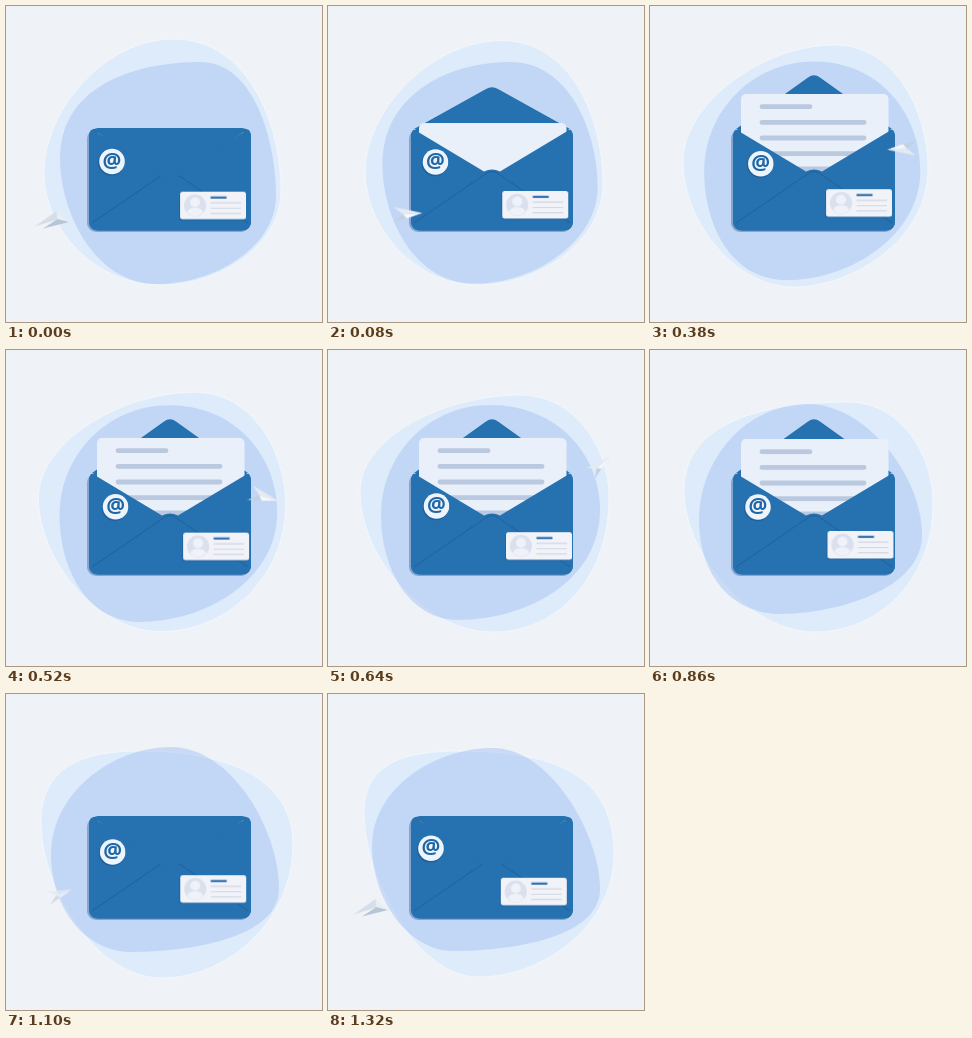
Recreate the animation shown at these times as an HTML page without scripts. Size 316 by 316 pixels, loop 1.34 s.

```html
<!DOCTYPE html>
<html lang="en">
<head>
<meta charset="utf-8">
<title>Mail envelope</title>
<style>
html, body { margin: 0; width: 100%; height: 100%; overflow: hidden; background: #eff2f6; }
svg { display: block; width: 100%; height: 100%; }
svg * { animation: 1340ms linear infinite; }

.outer { fill: #deebfa; stroke: #f5f9fd; stroke-width: .8; animation-name: outer; }
.inner { fill: rgb(168 195 244 / .5); animation-name: inner; }
.blue { fill: #2671b0; }
.fold { fill: none; stroke: #1f609d; stroke-width: 1; }
.shadow { fill: #4a72a8; opacity: .5; }

.flap { transform-origin: 164px 123px; }
.flap.up { animation-name: flap-up; }
.flap.down { animation-name: flap-down; }
.letter { animation-name: letter; }
.rows path {
  fill: none; stroke: #bac9df; stroke-width: 4.8; stroke-linecap: round;
  stroke-dasharray: 1 2; animation-name: write; animation-delay: var(--at);
  animation-fill-mode: backwards;
}
.badge { animation-name: badge; }
.badge text { font: 700 21px "Open Sans", sans-serif; fill: #1f66a6; text-anchor: middle; }
.card { animation-name: card; }
.flight { animation-name: flight, flight-fade; }
.rest { animation-name: rest, rest-fade; }

@keyframes outer {
  0% { d: path("M38 167C38 105 98 33 168 33C240 33 275 115 275 185C275 238 216 279 155 279C88 279 38 222 38 167Z"); }
  14.93% { d: path("M36 163C36 110 105 37 183 37C245 37 275 105 275 168C275 230 205 279 142 279C85 279 36 220 36 163Z"); }
  28.36% { d: path("M33 155C33 100 110 39 185 39C245 39 278 105 278 163C278 232 205 281 143 281C85 281 33 215 33 155Z"); }
  47.76% { d: path("M32 142C32 85 120 45 192 45C245 45 281 95 281 148C281 225 232 282 165 282C95 282 32 205 32 142Z"); }
  64.18% { d: path("M34 140C34 72 115 52 198 52C248 52 283 100 283 155C283 228 230 282 165 282C100 282 34 205 34 140Z"); }
  82.09% { d: path("M35 128C35 68 85 57 135 57C222 57 287 85 287 150C287 228 220 284 156 284C90 284 35 195 35 128Z"); }
  98.51%, 100% { d: path("M36 118C36 65 85 57 132 57C225 57 286 80 286 160C286 232 215 283 150 283C90 283 36 185 36 118Z"); }
}
@keyframes inner {
  0% { d: path("M54 152C54 85 120 56 195 56C248 56 270 135 270 190C270 240 210 278 150 278C90 278 54 208 54 152Z"); }
  14.93% { d: path("M55 165C55 105 105 56 165 56C230 56 269 110 269 170C269 225 205 277 140 277C85 277 55 225 55 165Z"); }
  47.76% { d: path("M53 165C53 105 100 55 162 55C230 55 272 105 272 160C272 230 200 270 130 270C82 270 53 220 53 165Z"); }
  64.18% { d: path("M49 170C49 110 95 54 158 54C215 54 272 125 272 185C272 240 185 264 130 264C82 264 49 225 49 170Z"); }
  82.09% { d: path("M45 160C45 100 105 53 165 53C225 53 273 135 273 195C273 245 180 258 125 258C80 258 45 215 45 160Z"); }
  98.51%, 100% { d: path("M44 152C44 95 105 54 165 54C222 54 272 140 272 195C272 245 180 257 125 257C80 257 44 205 44 152Z"); }
}
@keyframes flap-down {
  0%, 80.6%, 100% { transform: scaleY(1); }
  3.4%, 77.6% { transform: scaleY(0); }
}
@keyframes flap-up {
  0%, 3.4%, 77.6%, 100% { transform: scaleY(0); }
  6.8%, 74.6% { transform: scaleY(1); }
}
@keyframes letter {
  0%, 4.5% { transform: translateY(36px); animation-timing-function: ease-out; }
  17.2% { transform: none; }
  62.7% { transform: none; animation-timing-function: ease-in; }
  74.6%, 100% { transform: translateY(36px); }
}
@keyframes write {
  0% { stroke-dashoffset: 1.1; }
  5.2%, 69% { stroke-dashoffset: 0; }
  69.01%, 100% { stroke-dashoffset: 1.1; }
}
@keyframes badge {
  0% { transform: translate(106px, 155.5px); }
  14.93% { transform: translate(109.7px, 156.7px); }
  28.36% { transform: translate(110.8px, 157.7px); }
  47.76% { transform: translate(108.5px, 156px); }
  64.18% { transform: translate(108px, 157px); }
  82.09% { transform: translate(106.7px, 158px); }
  98.51%, 100% { transform: translate(103px, 154.3px); }
}
@keyframes card {
  0% { transform: translate(174px, 185.7px); }
  14.93% { transform: translate(174.6px, 184px); }
  28.36% { transform: translate(176px, 183.2px); }
  47.76% { transform: translate(178px, 182.2px); }
  64.18% { transform: translate(177.5px, 181px); }
  82.09% { transform: translate(174.2px, 181.2px); }
  98.51%, 100% { transform: translate(172.8px, 183.8px); }
}
@keyframes flight {
  0%, 3.73% { transform: translate(62px, 212px) rotate(22deg); }
  8.96% { transform: translate(100px, 206px) rotate(12deg); }
  14.93% { transform: translate(157px, 186px); }
  21.64% { transform: translate(262px, 150px) rotate(-20deg); }
  24.63% { transform: translate(281px, 120px) rotate(-80deg); }
  28.36% { transform: translate(253px, 141px) rotate(-161deg); }
  33.6% { transform: translate(244px, 162px) rotate(-260deg); }
  40.3% { transform: translate(260px, 144px) rotate(-340deg); }
  47.76% { transform: translate(272px, 117px) rotate(-380deg) scale(.88); }
  53.7% { transform: translate(286px, 101px) rotate(-385deg) scale(.75); }
  53.71%, 79.1% { transform: translate(62px, 196px) scale(.8); }
  82.09% { transform: translate(54px, 201px) scale(.85); }
  85.8%, 100% { transform: translate(44px, 211px) rotate(20deg); }
}
@keyframes flight-fade {
  0%, 3.72% { opacity: 0; }
  3.73%, 49% { opacity: 1; }
  54%, 79.1% { opacity: 0; }
  82.09% { opacity: .7; }
  85.8% { opacity: 1; }
  85.81%, 100% { opacity: 0; }
}
@keyframes rest {
  0% { transform: none; }
  1.5% { transform: translate(2px, 0); }
  3.73% { transform: translate(14px, -1px); }
  3.74%, 85.8% { transform: translate(-3px, -2px); }
  91% { transform: translate(-5.5px, 0); }
  98.51%, 100% { transform: translate(-3px, 0); }
}
@keyframes rest-fade {
  0%, 3.72% { opacity: 1; }
  3.73%, 85.8% { opacity: 0; }
  85.81%, 100% { opacity: 1; }
}
</style>
</head>
<body>
<svg viewBox="0 0 316 316">
  <path class="outer"/>
  <path class="inner"/>

  <rect class="shadow" x="81" y="123.5" width="163" height="102.5" rx="9"/>
  <rect class="blue" x="83" y="122" width="162" height="102.5" rx="9"/>
  <path class="blue flap up" d="M86 123L158 71.5Q164 67 170 71.5L242 123Z"/>

  <g class="letter">
    <rect x="91" y="88" width="147.5" height="95" rx="5" fill="#e9f0fa"/>
    <g class="rows">
      <path pathLength="1" d="M112 100.7H160" style="--at:90ms"/>
      <path pathLength="1" d="M112 116.4H214" style="--at:165ms"/>
      <path pathLength="1" d="M112 132H214" style="--at:235ms"/>
      <path pathLength="1" d="M112 147.6H214" style="--at:285ms"/>
      <path pathLength="1" d="M112 163H214" style="--at:320ms"/>
    </g>
  </g>

  <path class="blue" d="M83 131Q83 125 86 123.5L156 165.5Q164 161.5 172 165.5L242 123.5Q245 125 245 131V215.5Q245 224.5 236 224.5H92Q83 224.5 83 215.5Z"/>
  <path class="fold" d="M86 217L156 169Q164 162 172 169L242 217"/>
  <path class="blue flap down" d="M86 123L158 172.5Q164 177 170 172.5L242 123Z"/>

  <g class="badge">
    <circle cx="-.8" cy="1" r="13.2" fill="#1b558f" opacity=".6"/>
    <circle r="12.8" fill="#eef4fb"/>
    <text y="6">@</text>
  </g>

  <g class="card">
    <rect x="-.8" y="1" width="66" height="27.5" rx="2.5" fill="#1b558f" opacity=".5"/>
    <rect width="66" height="27.5" rx="2.5" fill="#f1f3f9"/>
    <circle cx="15" cy="13.7" r="11" fill="#dbe0ee"/>
    <g fill="#f0f2f9">
      <circle cx="15" cy="10.5" r="5"/>
      <path d="M7 21Q8 16 15 16T23 21Q15 28 7 21Z"/>
    </g>
    <path d="M30.5 5.8H46.5" stroke="#2f70b0" stroke-width="2.2"/>
    <path d="M30.5 11.2H61M30.5 16.5H61M30.5 21.7H61" stroke="#d3d8e4" stroke-width="1.2"/>
  </g>

  <g class="flight">
    <path d="M14-7L-15-4L-4 0Z" fill="#e3eaf2"/>
    <path d="M14-7L-4 0L-11 11Z" fill="#c4d0de"/>
    <path d="M14-7L-4 0L1 3Z" fill="#f3f6fa"/>
  </g>
  <g class="rest">
    <path d="M28.5 220.5L50.5 205L53 213Z" fill="#d5dfea"/>
    <path d="M37 222.5L53 212L63 216Z" fill="#b7c5d6"/>
    <path d="M50.5 205L63 216L51 213Z" fill="#e6edf4"/>
  </g>
</svg>
</body>
</html>
```
